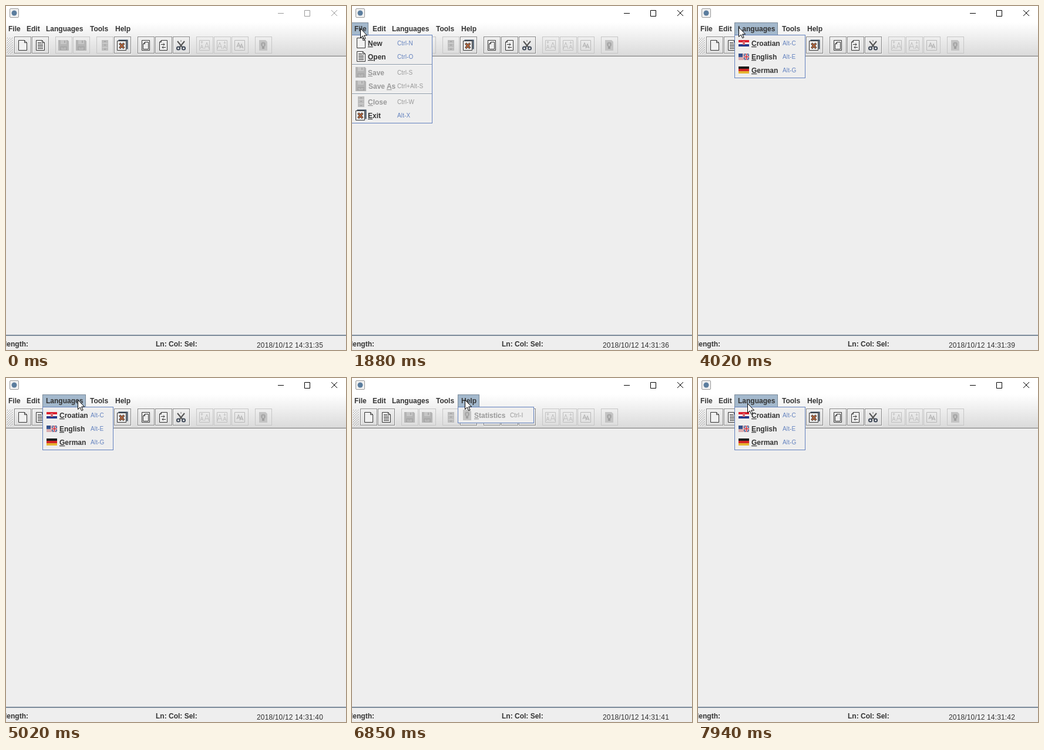
These frames come from a looping animation (579x586 px, 8 s). An HTML page:

```html
<!DOCTYPE html>
<html lang="en">
<head>
<meta charset="utf-8">
<title>Text editor menus</title>
<style>
  html, body { margin: 0; width: 100%; height: 100%; overflow: hidden; background: #eee; }
  svg { display: block; width: 579px; height: 586px; }
  text { font: bold 12px "Liberation Sans", Arial, sans-serif; fill: #333; white-space: pre; }
  text.off, text.key.off { fill: #999; }
  text.key { font-weight: normal; font-size: 10px; fill: #6382bf; letter-spacing: .12px; }
  #clock { font-weight: normal; letter-spacing: .15px; }
  .mn { text-decoration: underline; }
  #frame { fill: none; stroke: #999; }
  .menu { visibility: hidden; }
  .menu.open { visibility: visible; }
</style>
</head>
<body>
<svg id="stage" viewBox="0 0 579 586" xmlns="http://www.w3.org/2000/svg">
  <defs>
    <linearGradient id="bar" x1="0" y1="0" x2="0" y2="1">
      <stop offset="0" stop-color="#fff"/><stop offset="1" stop-color="#dadada"/>
    </linearGradient>
    <pattern id="grip" width="4" height="4" patternUnits="userSpaceOnUse">
      <path d="M0 0h1v1h-1zM2 2h1v1h-1z" fill="#8c8c8c"/>
      <path d="M1 1h1v1h-1zM3 3h1v1h-1z" fill="#fff"/>
    </pattern>
    <path id="sheet" d="M-6.5 -8.5H3.5L7.5 -4.5V8.5H-6.5ZM3.5 -8.5V-4.5H7.5"/>
    <g id="new" fill="#f1f1f1" stroke="#333"><use href="#sheet"/></g>
    <g id="open" fill="#f1f1f1" stroke="#333">
      <use href="#sheet"/><path d="M-4 -4.5H2M-4 -2H5M-4 .5H5M-4 3H5M-4 5.5H5"/>
    </g>
    <g id="save">
      <path d="M-9 -9H7L9 -7V9H-9Z" fill="#b4b4b4"/>
      <path d="M-5 -9H5V-2H-5Z" fill="#c6c6c6"/><path d="M1 -8H3V-4H1Z" fill="#aaa"/>
      <path d="M-6 2H6V8H-6Z" fill="#a6a6a6"/>
      <path d="M-4.5 4.5H-1M0 4.5H4.5M-4 6.5H4" stroke="#c9c9c9"/>
    </g>
    <g id="close">
      <path d="M-5 -9H6V9H-5Z" fill="#bcbcbc"/>
      <path d="M-4 -3.5H5M-4 3.5H5" stroke="#d2d2d2"/>
      <path d="M-1 -6.5H2M-1 -.5H2M-1 6.5H2" stroke="#999"/>
    </g>
    <g id="exit">
      <path d="M-6.5 -8.5H8.5V6.5" fill="none" stroke="#34465a" stroke-width="2"/>
      <path d="M-8.5 -7.5H6.5V8.5H-8.5Z" fill="#eee" stroke="#333"/>
      <path d="M-4.5 -3.5L3 5M3 -3.5L-4.5 5" stroke="#333" stroke-width="3.8"/>
      <path d="M-4.2 -3.2L2.7 4.7M2.7 -3.2L-4.2 4.7" stroke="#b5653c" stroke-width="2.2"/>
    </g>
    <g id="copy" fill="#eee" stroke="#333">
      <path d="M-6.5 -8.5H6.5V8.5H-6.5Z"/><path d="M-1.5 -5.5H4.5V6.5H-4.5V-2.5ZM-1.5 -5.5V-2.5H-4.5"/>
    </g>
    <g id="paste" fill="#eee" stroke="#333">
      <path d="M-6.5 -5.5L-3.5 -8.5H6.5V8.5H-6.5ZM-3.5 -8.5V-5.5H-6.5"/>
      <path d="M-4 -1.5H2M0 -3.5L2 -1.5L0 .5M4 3.5H-2M0 1.5L-2 3.5L0 5.5" fill="none"/>
    </g>
    <g id="cut" fill="none">
      <path d="M-6 -7L3 4M6 -7L-3 4" stroke="#555" stroke-width="2"/>
      <path d="M0 -9V-6" stroke="#777"/>
      <circle cx="-4.5" cy="5" r="2.6" stroke="#414b5a" stroke-width="2"/>
      <circle cx="4.5" cy="5" r="2.6" stroke="#414b5a" stroke-width="2"/>
    </g>
    <path id="box" d="M-8.5 -8.5H8.5V8.5H-8.5Z"/>
    <g id="upper" fill="none" stroke="#c0c0c0">
      <use href="#box"/><path d="M0 6L4 -5L8 6M1.5 2.5H6.5M-7 6L-4.5 -1L-2 6M-6 3.5H-3M-4.5 -3V-7M-6.5 -5L-4.5 -7L-2.5 -5"/>
    </g>
    <g id="lower" fill="none" stroke="#c0c0c0">
      <use href="#box"/><path d="M-8 6L-4 -5L0 6M-6.5 2.5H-1.5M2 6L4.5 -1L7 6M3 3.5H6M4.5 -7V-3M2.5 -5L4.5 -3L6.5 -5"/>
    </g>
    <g id="invert" fill="none" stroke="#b8b8b8">
      <use href="#box"/><path d="M-5 3L-2 -4L1 3M-4 1H0M0 5L3 -2L6 5M1 3H5" stroke-width="1.4"/>
    </g>
    <g id="info">
      <path d="M-7 -9H4L7 -6V9H-7Z" fill="#c4c4c4"/>
      <circle cy="-1.5" r="4" fill="#a8a8a8"/><path d="M-2 2H2V6H-2Z" fill="#a0a0a0"/>
      <path d="M0 -3V1" stroke="#d0d0d0" stroke-width="1.5"/>
    </g>
    <g id="print" fill="none" stroke="#b9b9b9" stroke-width="1.3">
      <ellipse rx="7.5" ry="8.3" stroke-dasharray="9 1.5"/><ellipse rx="5.2" ry="6" stroke-dasharray="7 1.5"/>
      <ellipse rx="3" ry="3.6" stroke-dasharray="5 1"/><path d="M0 -1V7"/>
    </g>
    <g id="hr">
      <path d="M-9 -5H9V-1H-9Z" fill="#dc2030"/><path d="M-9 -1H9V2H-9Z" fill="#fff"/>
      <path d="M-9 2H9V6H-9Z" fill="#263a8c"/><path d="M-2 -3H2V3H-2Z" fill="#d66a70"/>
    </g>
    <g id="en">
      <path d="M-9 -5H9V6H-9Z" fill="#e8dfe2"/><path d="M-9 -5H-2V1H-9Z" fill="#34508c"/>
      <path d="M-9 2.5H0M-9 5H0M-2 -4H0M-2 -1H0" stroke="#c66468"/>
      <path d="M0 -5H9V6H0Z" fill="#3d5690"/><path d="M0 -5L9 6M9 -5L0 6" stroke="#eee"/>
      <path d="M4.5 -5V6M0 .5H9" stroke="#eee" stroke-width="3"/>
      <path d="M4.5 -5V6M0 .5H9" stroke="#cf2f3c" stroke-width="1.6"/>
    </g>
    <g id="de">
      <path d="M-9 -6H9V-2H-9Z" fill="#1c1c1c"/><path d="M-9 -2H9V2H-9Z" fill="#d32626"/>
      <path d="M-9 2H9V6H-9Z" fill="#e5b431"/>
    </g>
  </defs>

  <rect width="579" height="586" fill="#eee"/>
  <rect width="579" height="28" fill="#fff"/>
  <rect x="6.5" y="4.5" width="15" height="15" rx="1.5" fill="#f1f1f1" stroke="#9a9a9a"/>
  <circle cx="14" cy="12" r="4.5" fill="#5b7d9e"/>
  <path id="frame" d="M463 12.5H473M508.5 7.5H517.5V17.5H508.5ZM554 7L564 17M564 7L554 17"/>
  <rect y="28" width="579" height="57" fill="url(#bar)"/>
  <path d="M0 84.5H579" stroke="#ccc"/><path d="M0 85.5H579" stroke="#7f7f7f"/>
  <rect x="1" y="53" width="10" height="29" fill="url(#grip)"/>
  <g id="tools"></g>
  <path d="M0 561H579" stroke="#7a8a99" stroke-width="2"/>
  <text x="-2" y="580">length:</text>
  <text x="255" y="580">Ln: Col: Sel:</text>
  <text id="clock" x="427" y="582"></text>
  <g id="menus"></g>
  <path id="mouse" d="M.5 .5V16.4L4.2 12.9L6.7 18.6L9.1 17.5L6.6 12H11.6Z" fill="#fff" stroke="#000"/>
</svg>
<script>
const LOOP = 8000;
const $ = id => document.getElementById(id);
const icon = (name, x, y) => `<use href="#${name}" transform="translate(${x} ${y})"/>`;
const label = (x, y, s, cls = '') =>
  `<text x="${x}" y="${y}" class="${cls}">${s.replace(/_(.)/, '<tspan class="mn">$1</tspan>')}</text>`;

// Toolbar: icon, left edge, enabled
const buttons = [
  ['new', 14, 1], ['open', 44, 1], ['save', 84, 0], ['save', 114, 0], ['close', 154, 0],
  ['exit', 184, 1], ['copy', 224, 1], ['paste', 254, 1], ['cut', 284, 1],
  ['upper', 324, 0], ['lower', 354, 0], ['invert', 384, 0], ['info', 424, 0]
];
$('tools').innerHTML = buttons.map(([name, x, on]) =>
  (on ? `<path d="M${x + 1.5} 80V53.5H${x + 28}M${x} 81.5H${x + 29.5}V53" fill="none" stroke="#fff" opacity=".75"/>` : '') +
  `<rect x="${x + .5}" y="52.5" width="28" height="28" fill="none" stroke="${on ? '#858585' : '#c6c6c6'}"/>` +
  icon(name, x + 14, 67)).join('');

// Item: icon, text, baseline, text x, shortcut, enabled
const menus = [
  { title: 'File', x: -1, tab: 29, w: 138, h: 151, tx: 4, key: 77, lines: [99, 149], items: [
    ['new', '_New', 68, 27, 'Ctrl-N', 1], ['open', '_Open', 91, 27, 'Ctrl-O', 1],
    ['save', '_Save', 118, 27, 'Ctrl-S', 0], ['save', 'Save _As', 141, 28, 'Ctrl+Alt-S', 0],
    ['close', '_Close', 168, 27, 'Ctrl-W', 0], ['exit', '_Exit', 191, 27, 'Alt-X', 1]] },
  { title: 'Edit', x: 29, tab: 33, w: 107, h: 74, tx: 35, key: 95, items: [
    ['copy', '_Copy', 68, 57, 'Ctrl-C', 1], ['paste', '_Paste', 91, 57, 'Ctrl-V', 1],
    ['cut', 'C_ut', 114, 57, 'Ctrl-X', 1]] },
  { title: 'Languages', x: 62, tab: 74, w: 121, h: 74, tx: 68, key: 144, items: [
    ['hr', '_Croatian', 68, 91, 'Alt-C', 1], ['en', '_English', 91, 91, 'Alt-E', 1],
    ['de', '_German', 114, 91, 'Alt-G', 1]] },
  { title: 'Tools', x: 137, tab: 42, w: 149, h: 70, tx: 143, key: 245, items: [
    ['', 'Change case', 67, 166, '', 1], ['', 'Sort', 88, 167, '', 1],
    ['print', 'Uni_que', 110, 166, 'Ctrl-U', 0]] },
  { title: 'Help', x: 180, tab: 37, w: 130, h: 28, tx: 186, key: 269, items: [
    ['info', '_Statistics', 68, 208, 'Ctrl-I', 0]] }
];
const item = m => ([pic, text, y, x, keys, on]) => {
  const off = on ? '' : 'off';
  return (pic ? icon(pic, m.x + 16, y - 5) : `<path d="M275 ${y - 10}V${y}L280 ${y - 5}Z" fill="#333"/>`) +
    label(x, y, text, off) + (keys && label(m.key, y - 1, keys, 'key ' + off));
};
$('menus').innerHTML = menus.map(m => `
  <g class="menu">
    <rect x="${m.x + .5}" y="28.5" width="${m.tab - 1}" height="21" fill="#a3b8cc" stroke="#7a8a99"/>
    <rect x="${m.x + .5}" y="49.5" width="${m.w - 1}" height="${m.h - 1}" fill="#eee" stroke="#6382bf"/>
    ${(m.lines || []).map(y => `<path d="M0 ${y + .5}H136" stroke="#8896a3"/><path d="M0 ${y + 1.5}H136" stroke="#fff"/>`).join('')}
    ${m.items.map(item(m)).join('')}
  </g>`).join('') + menus.map(m => label(m.tx, 43, m.title)).join('');
const popups = [...document.querySelectorAll('.menu')];

// Pointer path: time, x, y
const path = [
  [540, 110, 574], [800, 62, 330], [1050, 18, 140], [1250, 6, 76], [1320, 6, 70],
  [1370, 7, 64], [1560, 12, 40], [1940, 14, 38], [2500, 16, 38], [2760, 25, 37],
  [3020, 48, 37], [3700, 50, 37], [4020, 69, 36], [4140, 82, 37], [4449, 82, 37],
  [4450, 82, 36], [4760, 84, 36], [5280, 160, 37], [5959, 160, 37], [5960, 164, 37],
  [6220, 196, 37], [6850, 192, 37], [7230, 137, 36], [7630, 96, 37],
  [7680, 94, 38], [7940, 84, 43], [8000, 84, 43]
];
const pauses = [[1940, 2500], [3020, 3700], [4140, 4449], [4450, 4760], [5280, 5959], [6220, 6850]];

function pointer(t) {
  const rest = pauses.find(([a, b]) => t >= a && t < b);
  if (rest) t = rest[0];
  const i = Math.max(1, path.findIndex(p => p[0] > t));
  const [a, ax, ay] = path[i - 1], [b, bx, by] = path[i], k = (t - a) / (b - a);
  return [Math.round(ax + (bx - ax) * k), Math.round(ay + (by - ay) * k)];
}

const OPEN = 1620, ACTIVE = 1560;
function draw(t) {
  const shown = t >= 540;
  const [x, y] = pointer(Math.max(t, 540));
  $('mouse').setAttribute('visibility', shown ? 'visible' : 'hidden');
  $('mouse').setAttribute('transform', `translate(${x} ${y})`);
  $('frame').style.stroke = t >= ACTIVE ? '#000' : '#999';
  $('clock').textContent = '2018/10/12 14:31:' + (35 + Math.max(0, Math.floor((t - 930) / 1005) + 1));
  const current = t >= OPEN ? menus.filter(m => x >= m.x).length - 1 : -1;
  popups.forEach((p, i) => p.classList.toggle('open', i === current));
}

const start = performance.now();
function tick() {
  draw((performance.now() - start) % LOOP);
  requestAnimationFrame(tick);
}
draw(0);
requestAnimationFrame(tick);
</script>
</body>
</html>
```
